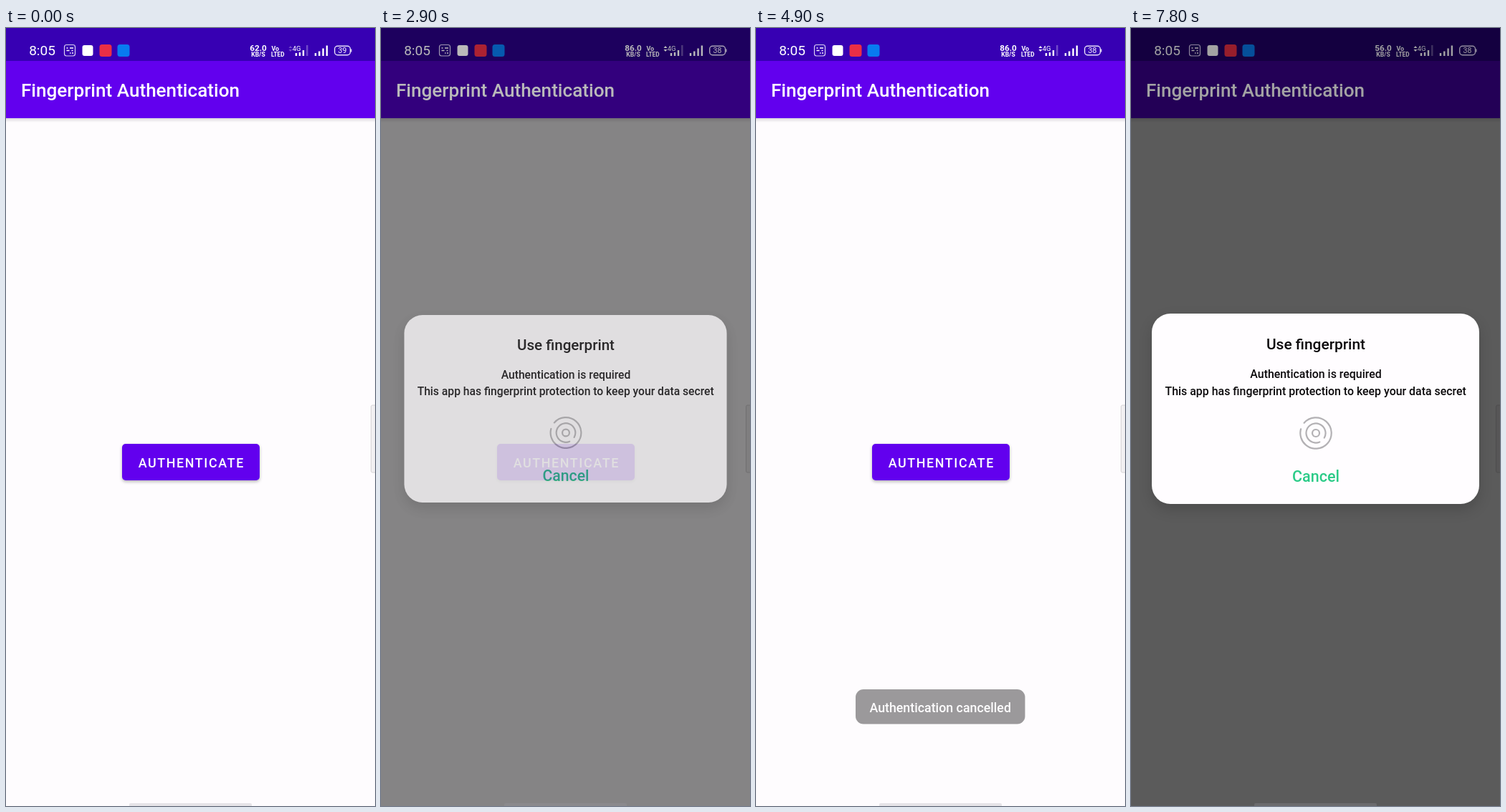
Animation of 515x1087 px, one loop 8000 ms. Source, as an HTML page:

```html
<!DOCTYPE html>
<html lang="en">
<head>
<meta charset="utf-8">
<title>Fingerprint Authentication</title>
<style>
  html, body { margin: 0; width: 100%; height: 100%; overflow: hidden; background: #fefcfe; }
  svg { display: block; width: 515px; height: 1087px; }
  text { font-family: Roboto, sans-serif; text-anchor: middle; }
  .medium { font-weight: 500; }
  .bold { font-weight: 700; }
  #dialog { transform-origin: 257px 532px; }
  #card { filter: drop-shadow(0 8px 9px rgba(0, 0, 0, .16)); }
  #button { filter: drop-shadow(0 2px 2px rgba(0, 0, 0, .28)); }
</style>
</head>
<body>
<svg viewBox="0 0 515 1087">
  <defs>
    <linearGradient id="barShade" x1="0" y1="0" x2="0" y2="1">
      <stop offset="0" stop-color="#000" stop-opacity=".13"/>
      <stop offset="1" stop-color="#000" stop-opacity="0"/>
    </linearGradient>
    <radialGradient id="touchFill">
      <stop offset="0" stop-color="#fbf9ff" stop-opacity=".68"/>
      <stop offset=".72" stop-color="#f6f4fc" stop-opacity=".64"/>
      <stop offset=".8" stop-color="#ccc8da" stop-opacity=".55"/>
      <stop offset="1" stop-color="#d8d4e6" stop-opacity="0"/>
    </radialGradient>
    <clipPath id="buttonClip"><rect x="162" y="581" width="192" height="51" rx="5"/></clipPath>
    <clipPath id="cancelClip"><path d="M29 595H486V639a26 26 0 0 1-26 26H55a26 26 0 0 1-26-26Z"/></clipPath>
  </defs>

  <rect width="515" height="1087" fill="#fefcfe"/>
  <rect y="126" width="515" height="6" fill="url(#barShade)"/>
  <rect width="515" height="126" fill="#6200ee"/>
  <rect width="515" height="46" fill="#3700b3"/>

  <rect id="button" x="162" y="581" width="192" height="51" rx="5" fill="#6200ee"/>
  <g clip-path="url(#buttonClip)"><circle id="buttonRipple" cx="309" cy="615" fill="#fff"/></g>
  <text class="medium" x="258.8" y="613.5" font-size="17.9" letter-spacing="1.6" fill="#fff">AUTHENTICATE</text>
  <rect x="509.5" y="527" width="9" height="94" rx="2" fill="#f2f0f2" stroke="#d6d4d6"/>

  <rect id="dim" width="515" height="1087" fill="#000"/>
  <rect x="172" y="1083" width="171" height="6" rx="2" fill="#9c9ca2" fill-opacity=".25"/>

  <g id="bright" fill="#fff">
    <text class="medium" x="173.5" y="96" font-size="26.1">Fingerprint Authentication</text>
    <text x="50.5" y="38" font-size="19">8:05</text>
    <rect x="81.5" y="23.5" width="15" height="15.5" rx="3" fill="none" stroke="#d9cff2" stroke-width="1.2"/>
    <path d="M84.5 28h2m2.5 0h5M84.5 31.5h4m3 0h2M89 35h1.5m1.500 0h2" stroke="#fff" stroke-width="1.7"/>
    <rect x="106.500" y="24" width="15" height="15" rx="3"/>
    <rect x="130.500" y="23" width="17" height="17" rx="3.500" fill="#ea2f45"/>
    <rect x="155.500" y="23" width="17" height="17" rx="3.500" fill="#087bf0"/>

    <text id="speed" class="bold" x="352" y="31.800" font-size="11.800"></text>
    <text class="bold" x="352" y="39.800" font-size="8.600">KB/S</text>
    <text class="bold" x="375.800" y="31.500" font-size="9">Vo</text>
    <text class="bold" x="379.200" y="39.500" font-size="8.200">LTED</text>
    <g id="arrows"><path d="M394.500 28l2.500-3 2.500 3ZM394.500 30h5l-2.500 3Z"/></g>
    <text x="405.700" y="32" font-size="9.500">4G</text>
    <path d="M405 39v-4M410 39v-5M415 39v-8M432 39v-4M437.300 39v-6.500M442.600 39v-10.500M447.900 39v-14.500" stroke="#fff" stroke-width="2.400"/>
    <path d="M420.300 39v-15" stroke="#fff" stroke-opacity=".3" stroke-width="2.400"/>
    <rect x="458.700" y="25.200" width="21.800" height="12.600" rx="4" fill="none" stroke="#e6def8" stroke-width="1.400"/>
    <path d="M481.800 29.500v4" stroke="#e6def8" stroke-width="1.400"/>
    <text id="battery" x="469.500" y="35.300" font-size="10.500"></text>
  </g>

  <g id="dialog">
    <rect id="card" x="29" y="399" width="457" height="266" rx="26" fill="#fffdff"/>
    <g clip-path="url(#cancelClip)"><circle id="cancelRipple" cx="265.500" cy="634" fill="#f1eff2"/></g>
    <g class="medium" fill="#0c0a0c">
      <text x="258" y="448.500" font-size="20.900">Use fingerprint</text>
      <text x="258" y="489" font-size="15.900">Authentication is required</text>
      <text x="257.700" y="513" font-size="15.900">This app has fingerprint protection to keep your data secret</text>
      <text x="258" y="634.300" font-size="21.500" fill="#2bcb88">Cancel</text>
    </g>
    <g fill="none" stroke="#b3b1b4" stroke-width="2.200" stroke-linecap="round">
      <circle cx="258" cy="566" r="21.700" pathLength="360" stroke-dasharray="334 26" transform="rotate(221 258 566)"/>
      <circle cx="258" cy="566" r="13.500" pathLength="360" stroke-dasharray="322 38" transform="rotate(67 258 566)"/>
      <circle cx="258" cy="566" r="5"/>
    </g>
  </g>

  <g id="toast">
    <rect x="139" y="924" width="236.500" height="48.500" rx="11" fill="#1f1d1f"/>
    <text class="medium" x="257.200" y="955.500" font-size="17.800" fill="#fff">Authentication cancelled</text>
  </g>
  <circle id="touch" r="20" fill="url(#touchFill)"/>
</svg>
<script>
const LOOP = 8000, STEP = 100;
const OPEN = [2600, 7400], CANCEL = 4600;
const $ = id => document.getElementById(id);
const set = (id, attrs) => {
  for (const k in attrs) $(id).setAttribute(k, attrs[k]);
};

// Linear interpolation through [time, value] points, held at both ends.
function at(points, t) {
  if (t <= points[0][0]) return points[0][1];
  for (let i = 1; i < points.length; i++) {
    const [t0, a] = points[i - 1], [t1, b] = points[i];
    if (t <= t1) return a + (b - a) * (t - t0) / (t1 - t0);
  }
  return points[points.length - 1][1];
}

const SHOW = [[100, 0], [200, .3], [300, .75], [400, 1]];
const HIDE = [[100, 1], [200, .4], [300, 0]];
const TAP = [[0, 1], [100, .8], [200, 0]];
const BUTTON_RADIUS = [[0, 0], [100, 90], [200, 160]];
const BUTTON_ALPHA = [[0, 0], [100, .22], [200, .2], [400, 0]];
const CANCEL_RADIUS = [[0, 30], [100, 171], [200, 245]];
const TOAST = [[4800, 0], [4900, .44], [5000, .74], [5100, .92], [5300, 1],
               [6800, 1], [6900, .82], [7000, .5], [7100, .18], [7200, 0]];

function draw(t) {
  const opened = t < OPEN[1] ? OPEN[0] : OPEN[1];
  const since = t - opened, sinceCancel = t - CANCEL;
  const closing = opened === OPEN[0] ? at(HIDE, sinceCancel) : 1;
  const shown = at(SHOW, since) * closing;
  const pressing = sinceCancel >= 0 && t < OPEN[1];
  const sinceTap = pressing ? sinceCancel : since;

  set('dim', { opacity: .64 * shown });
  $('bright').style.filter = `brightness(${1 - .36 * shown})`;
  set('dialog', { opacity: shown });
  $('dialog').style.transform = `scale(${.94 + .06 * shown})`;

  set('buttonRipple', { r: at(BUTTON_RADIUS, since), opacity: at(BUTTON_ALPHA, since) });
  set('cancelRipple', { r: pressing ? at(CANCEL_RADIUS, sinceCancel) : 0 });
  set('touch', {
    cx: pressing ? 270 : 309.5,
    cy: pressing ? 637 : 615.5,
    opacity: sinceTap < 0 ? 0 : at(TAP, sinceTap)
  });
  set('toast', { opacity: at(TOAST, t) });

  set('arrows', { opacity: t < 500 ? .3 : 1 });
  $('battery').textContent = t < 800 ? '39' : '38';
  $('speed').textContent = t < 2900 ? '62.0' : t < 7000 ? '86.0' : '56.0';
}

const start = performance.now();
function tick(now) {
  const t = Math.max(0, now - start) % LOOP;
  draw(Math.floor(t / STEP) * STEP);
  requestAnimationFrame(tick);
}
draw(0);
requestAnimationFrame(tick);
</script>
</body>
</html>
```
